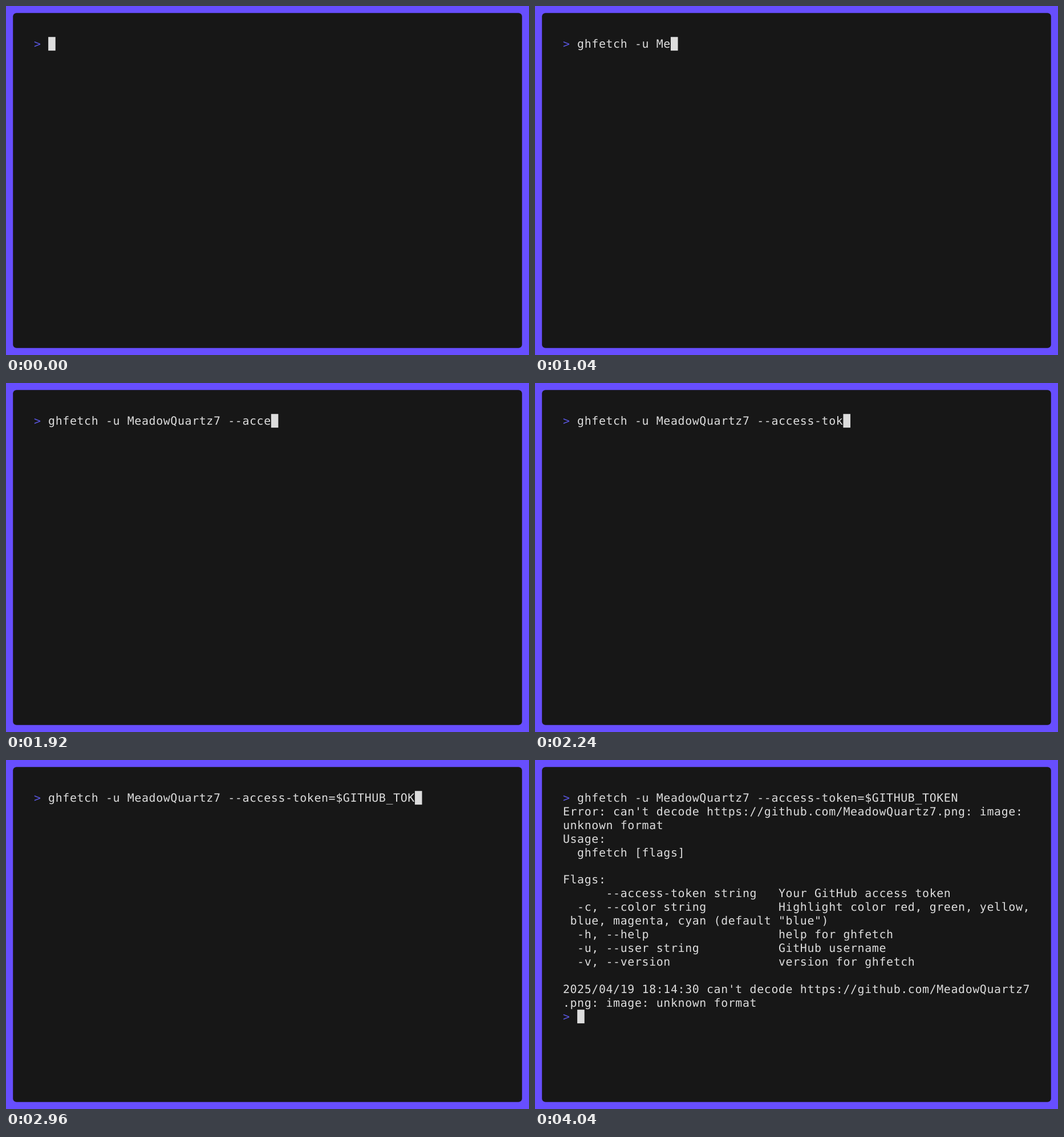
Recreate the animation shown at these times as an HTML page. Size 917 px wide and 611 px high, loop 8 s.

```html
<!DOCTYPE html>
<html lang="en">
<head>
<meta charset="utf-8">
<title>Terminal session</title>
<style>
  html, body { margin: 0; width: 100%; height: 100%; overflow: hidden; background: #674eff; }
  svg { display: block; width: 100%; height: 100%; }
  text { font: 26px "DejaVu Sans Mono", monospace; fill: #ddd; text-rendering: geometricPrecision; }
  .prompt { fill: #5a56e0; }
</style>
</head>
<body>
<svg viewBox="0 0 1200 800" preserveAspectRatio="none">
  <rect width="1200" height="800" fill="#674eff"/>
  <rect x="16" y="16" width="1168" height="768" rx="8" fill="#171717"/>
  <rect id="cursor" fill="#ddd"/>
  <g id="screen"></g>
</svg>
<script>
const LOOP = 8000, HIDE_CURSOR = 3600, PRINT = 4000, PROMPT = 4040;
const COLS = 65, LEFT = 64, TOP = 71, BASELINE = 24.3;
const CELL_W = 1072 / COLS, CELL_H = 658 / 21;

const user = "MeadowQuartz7";
const command = `ghfetch -u ${user} --access-token=$GITHUB_TOKEN`;
const flag = (name, help) => name.padEnd(30) + help;
const output = [
  `Error: can't decode https://github.com/${user}.png: image:`,
  "unknown format",
  "Usage:",
  "  ghfetch [flags]",
  "",
  "Flags:",
  flag("      --access-token string", "Your GitHub access token"),
  flag("  -c, --color string", "Highlight color red, green, yellow,"),
  ' blue, magenta, cyan (default "blue")',
  flag("  -h, --help", "help for ghfetch"),
  flag("  -u, --user string", "GitHub username"),
  flag("  -v, --version", "version for ghfetch"),
  "",
  `2025/04/19 18:14:30 can't decode https://github.com/${user}`,
  ".png: image: unknown format"
];
const lastRow = output.length + 1;

// One key every 50 ms, shown on a 40 ms refresh; a few keys show late.
const late = { 34: 2120, 45: 2680, 51: 2960 };
const keyTimes = [...command].map((_, i) =>
  late[i + 1] ?? Math.ceil((440 + 50 * i) / 40 - 0.5) * 40);

const screen = document.getElementById("screen");
const cursor = document.getElementById("cursor");
const colX = col => LEFT + col * CELL_W;
const rowY = row => TOP + row * CELL_H;

function setText(el, str) {
  const value = str.replaceAll(" ", "\u00a0");
  if (el.textContent !== value) el.textContent = value;
}

function addText(str, row, col = 0, className = "") {
  const el = document.createElementNS("http://www.w3.org/2000/svg", "text");
  el.setAttribute("x", Array.from({ length: COLS - col }, (_, i) => colX(col + i).toFixed(2)).join(" "));
  el.setAttribute("y", rowY(row) + BASELINE);
  el.setAttribute("class", className);
  setText(el, str);
  screen.append(el);
  return el;
}

const show = (el, on) => el.setAttribute("visibility", on ? "visible" : "hidden");

function placeCursor(row, col) {
  cursor.setAttribute("x", colX(col));
  cursor.setAttribute("y", rowY(row));
}

cursor.setAttribute("width", CELL_W);
cursor.setAttribute("height", CELL_H);
addText(">", 0, 0, "prompt");
const typed = addText("", 0, 2);
const lines = output.map((line, i) => addText(line, i + 1));
const nextPrompt = addText(">", lastRow, 0, "prompt");

function render(t) {
  const count = keyTimes.filter(time => time <= t).length;
  const done = t >= PROMPT;
  setText(typed, command.slice(0, count));
  lines.forEach(line => show(line, t >= PRINT));
  show(nextPrompt, done);
  show(cursor, t < HIDE_CURSOR || done);
  placeCursor(done ? lastRow : 0, done ? 2 : 2 + count);
}

const start = performance.now();
function tick() {
  render((performance.now() - start) % LOOP);
  requestAnimationFrame(tick);
}
tick();
</script>
</body>
</html>
```
